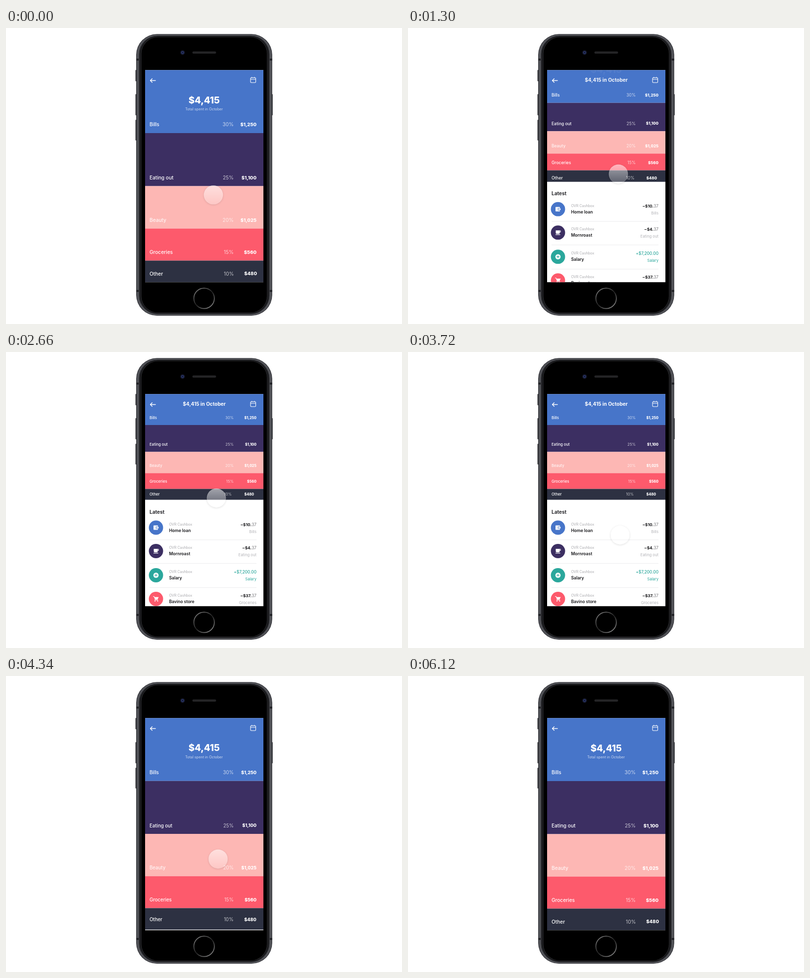
Recreate the animation shown at these times as an HTML page with a canvas. Size 800 by 600 pixels, loop 6.14 s.

```html
<!DOCTYPE html>
<html lang="en">
<head>
<meta charset="utf-8">
<title>Spending overview</title>
<style>
html, body { margin: 0; width: 100%; height: 100%; overflow: hidden; background: #fff; }
canvas { display: block; }
</style>
</head>
<body>
<canvas id="stage" width="800" height="600"></canvas>
<script>
const c = document.getElementById('stage').getContext('2d');
const LOOP = 6140, RUN = 600, CLOSE = 895, OPEN = 3858;
const BLUE = '#4775c9', PURPLE = '#3c2f62', PINK = '#fdb7b4', RED = '#fd5a6c', DARK = '#2d3142', TEAL = '#2ba79c';

// name, share, amount, colour, bottom edge when open and when folded
const bands = [
  ['Bills', '30%', '$1,250', BLUE, 213, 148],
  ['Eating out', '25%', '$1,100', PURPLE, 320.5, 202.5],
  ['Beauty', '20%', '$1,025', PINK, 406.5, 245.5],
  ['Groceries', '15%', '$560', RED, 471.5, 277.5],
  ['Other', '10%', '$480', DARK, 515, 299.5]
];
// title, amount, cents, category, colour, icon centre, icon
const rows = [
  ['Home loan', '−$10.', '37', 'Bills', BLUE, 356, wallet],
  ['Mornroast', '−$4.', '37', 'Eating out', PURPLE, 403.5, cup],
  ['Salary', '+$7,200.00', '', 'Salary', TEAL, 452.5, plus],
  ['Bavino store', '−$37.', '37', 'Groceries', RED, 500.5, cart]
];

const clamp = x => Math.max(0, Math.min(1, x));
const lerp = (a, b, k) => a + (b - a) * k;
const span = (t, from, to) => clamp((t - from) / (to - from));
const smooth = k => k * k * (3 - 2 * k);
const quint = k => k < .5 ? 16 * k ** 5 : 1 - 16 * (1 - k) ** 5;

function rect(x, y, w, h, fill, r = 0) {
  c.fillStyle = fill;
  c.beginPath();
  c.roundRect(x, y, w, h, r);
  c.fill();
}
function disc(x, y, r, fill) {
  c.fillStyle = fill;
  c.beginPath();
  c.arc(x, y, r, 0, 7);
  c.fill();
}
function line(d, color, width) {
  c.strokeStyle = color;
  c.lineWidth = width;
  c.stroke(new Path2D(d));
}
// y is the middle of the capitals
function text(s, x, y, size, weight, color, align = 'left', alpha = 1) {
  c.globalAlpha = alpha;
  c.font = `${weight} ${size}px Inter, sans-serif`;
  c.textAlign = align;
  c.fillStyle = color;
  c.fillText(s, x, y + size * .36);
  c.globalAlpha = 1;
}
function fade(x0, y0, x1, y1, ...stops) {
  const g = c.createLinearGradient(x0, y0, x1, y1);
  stops.forEach((s, i) => g.addColorStop(i / (stops.length - 1), s));
  return g;
}

function wallet() {
  rect(-5, -4.5, 9, 9, '#fff', 1);
  rect(-.5, -2.5, 6, 5, BLUE, 1);
  rect(.2, -1.8, 5, 3.6, '#fff', .6);
  disc(2, 0, .8, BLUE);
}
function cup() {
  rect(-4.5, -4.5, 8, 7, '#fff', [0, 0, 2, 2]);
  line('M3 -3.7H5V-1H3', '#fff', 1.1);
  rect(-5, 3.6, 9.5, 1.2, '#fff');
}
function plus() {
  disc(0, 0, 5.3, '#fff');
  line('M-2.8 0H2.8M0 -2.8V2.8', TEAL, 1.2);
}
function cart() {
  line('M-6 -5H-4L-1.5 .8H3.5', '#fff', 1.1);
  c.fillStyle = '#fff';
  c.fill(new Path2D('M-3.7 -3.8H5.5L3.3 .6H-1.8Z'));
  line('M-1.6 .6L-2.6 2.4H4.2', '#fff', 1);
  disc(-2, 4.3, 1.1, '#fff');
  disc(3.4, 4.3, 1.1, '#fff');
}

function phone() {
  for (const [y, h] of [[85, 23], [134, 43], [186, 42]]) rect(261.6, y, 3, h, '#2b2c30', 1);
  rect(535.8, 134, 3, 43, '#2b2c30', 1);
  // metal rim, from the outside in
  const rim = [[0, '#3a3b40'], [1.8, '#55565b'], [5.2, '#2c2d31'], [7.6, '#0c0c0e'], [9.4, '#3c3d41'], [10.4, '#000']];
  for (const [inset, color] of rim) {
    const dy = inset * .6;
    rect(263 + inset, 12.3 + dy, 274.8 - 2 * inset, 571 - 2 * dy, color, 42 - inset * .8);
  }
  for (const y of [62, 531]) {
    rect(263, y, 5, 4, '#222327');
    rect(532.8, y, 5, 4, '#222327');
  }
  rect(376.5, 47.5, 48, 4.5, '#242426', 2.2);
  disc(356.7, 49.8, 4.6, '#171a2b');
  disc(356.7, 49.8, 2.8, '#29376f');
  disc(356.7, 49.8, 1.3, '#0b0d1c');
  c.strokeStyle = fade(386, 530, 415, 566, '#777', '#222', '#888');
  c.lineWidth = 1.8;
  c.beginPath();
  c.arc(400.2, 548, 20.7, 0, 7);
  c.stroke();
}

function list(dy) {
  text('Latest', 290, 324.5 + dy, 10, 700, '#2a2a2e');
  rows.forEach(([name, sum, cents, kind, color, mid, icon], i) => {
    const y = mid + dy, income = !cents;
    disc(303, y, 14.4, color);
    c.save();
    c.translate(303, y);
    icon();
    c.restore();
    text('OVR Cashbox', 329.5, y - 7, 7.2, 400, '#a9a9ad');
    text(name, 329.5, y + 5.5, 8.5, 600, '#151518');
    if (income) text(sum, 506, y - 6.3, 8.3, 500, TEAL, 'right');
    else {
      text(cents, 506, y - 6.3, 8.3, 400, '#77777b', 'right');
      text(sum, 496, y - 6.3, 8.2, 700, '#151518', 'right');
    }
    text(kind, 506, y + 8, 7.7, 400, income ? TEAL : '#b4b4b8', 'right');
    if (i < 3) rect(290, [380.3, 428, 477][i] + dy, 216, 1, '#ececee');
  });
}

function screen(k) {
  const p = quint(k), size = lerp(1, .758, k);
  c.save();
  c.beginPath();
  c.rect(281, 85.3, 239, 429.9);
  c.clip();
  rect(280, 85, 241, 431, '#fff');
  list(198.3 * (1 - p));

  let top = 85;
  for (const [name, share, sum, color, open, folded] of bands) {
    const bottom = lerp(open, folded, p), last = name === 'Other';
    const y = last ? top + lerp(26.5, 10.5, k) : bottom - lerp(17.3, 14.8, k);
    rect(280, top, 241, bottom - top, color);
    text(name, 290, y, 10.1 * size, 500, '#fff', 'left', name === 'Beauty' ? .88 : 1);
    text(share, last ? lerp(460.5, 456, k) : 460, y, 10.1 * size, 400, '#fff', 'right', .72);
    text(sum, last ? lerp(507, 501, k) : 506, y, 9.5 * size, 800, '#fff', 'right');
    top = bottom;
  }

  const rise = 65 * p;
  text('$4,415', 400.3, 145.9 - rise, 18.7, 800, '#fff', 'center', 1 - p);
  text('Total spent in October', 400, 164.3 - rise, 7.3, 400, '#fff', 'center', .72 * (1 - p));
  text('$4,415 in October', 400.5, lerp(99.6, 105.5, p), 10, 700, '#fff', 'center', p);

  c.lineCap = c.lineJoin = 'round';
  line('M302 106.5H291.5M295.3 102.7L291.5 106.5L295.3 110.3', '#fff', 1.4);
  line('M495.5 100.7H503Q504.5 100.7 504.5 102.2V109.3Q504.5 110.8 503 110.8H495.5Q494 110.8 494 109.3V102.2Q494 100.7 495.5 100.7ZM494 104H504.5M496.7 99.5V101M501.8 99.5V101', '#fff', 1.1);
  c.lineCap = 'butt';
  c.restore();
}

function touch(t) {
  const alpha = 1 - span(t, 5000, 5300);
  if (!alpha) return;
  const a = smooth(span(t, 0, 700)), b = smooth(span(t, 2800, 3600));
  const x = lerp(lerp(419, 425, a), 428.5, b), y = lerp(lerp(338.3, 296, a), 371, b);
  const press = Math.max(
    span(t, 760, 860) * (1 - span(t, 1100, 1200)),
    span(t, 3720, 3820) * (1 - span(t, 4050, 4150)));
  const r = lerp(19.3, 17.7, press);
  c.save();
  c.globalAlpha = alpha;

  // shadow only outside the disc, so the disc stays see-through
  c.save();
  c.beginPath();
  c.rect(0, 0, 800, 600);
  c.arc(x, y, r, 0, 7);
  c.clip('evenodd');
  c.shadowColor = `rgba(0,0,0,${.45 * (1 - press)})`;
  c.shadowBlur = 4;
  c.shadowOffsetY = 1;
  disc(x, y, r - .3, `rgba(0,0,0,${.3 * (1 - press)})`);
  c.restore();

  const high = lerp(.56, .36, press), low = lerp(.22, .2, press);
  disc(x, y, r, fade(0, y - r, 0, y + r, `rgba(255,255,255,${high})`, `rgba(255,255,255,${low})`));
  c.strokeStyle = `rgba(255,255,255,${lerp(.12, .75, press)})`;
  c.lineWidth = 1;
  c.beginPath();
  c.arc(x, y, r - .4, 0, 7);
  c.stroke();
  c.restore();
}

function draw(now) {
  const t = now % LOOP;
  const k = span(t, CLOSE, CLOSE + RUN) - span(t, OPEN, OPEN + RUN);
  rect(0, 0, 800, 600, '#fff');
  phone();
  screen(k);
  touch(t);
}

const start = performance.now();
function tick() {
  draw(performance.now() - start);
  requestAnimationFrame(tick);
}
tick();
</script>
</body>
</html>
```
